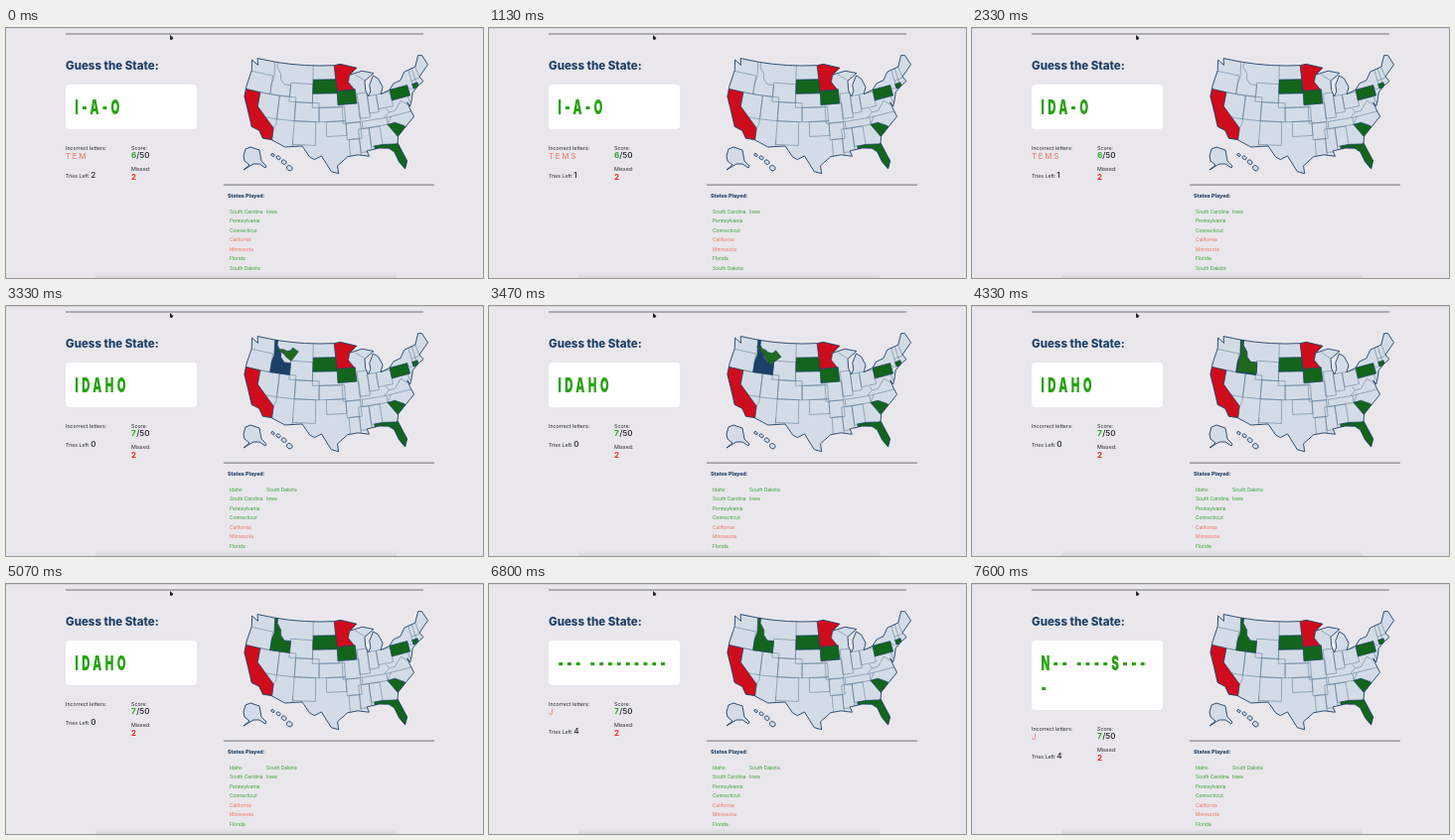
Recreate the animation shown at these times as an HTML page with a canvas. Size 480 px wide and 252 px high, loop 8 s.

```html
<!DOCTYPE html>
<html lang="en">
<head>
<meta charset="utf-8">
<title>Guess the State</title>
<style>
html, body { margin: 0; width: 100%; height: 100%; overflow: hidden; background: #e9e7ec; }
canvas { display: block; width: 480px; height: 252px; }
</style>
</head>
<body>
<canvas id="stage"></canvas>
<script>
const W = 480, H = 252, LOOP = 8000;
const canvas = document.getElementById('stage');
const ctx = canvas.getContext('2d');
const dpr = window.devicePixelRatio || 1;
canvas.width = W * dpr;
canvas.height = H * dpr;

const NAVY = '#1d4068', INK = '#24242c', GREEN = '#2fa32b', CORAL = '#f4705c';
const LAND = '#d3dce6', WON = '#12651b', LOST = '#cf0c1b', LETTER = '#28a212';

// Albers conic projection; longitudes are degrees west
function project(lon, lat) {
  const rad = Math.PI / 180, n = 0.60285;
  const rho = Math.sqrt(1.3512 - 2 * n * Math.sin(lat * rad)) / n;
  const th = n * (101.7 - lon) * rad;
  return [316.3 + 258 * rho * Math.sin(th), 37.7 + 270 * (rho * Math.cos(th) - 1.1007)];
}

// "x y,x y,..." to a path
function trace(text, map = project, close = true) {
  const path = new Path2D();
  text.split(',').forEach((pair, i) => {
    const [x, y] = map(...pair.split(' ').map(Number));
    i ? path.lineTo(x, y) : path.moveTo(x, y);
  });
  if (close) path.closePath();
  return path;
}
const flat = (x, y) => [x, y];
const line = text => trace(text, project, false);
const box = (w, n, e, s) => trace(`${w} ${n},${e} ${n},${e} ${s},${w} ${s}`);

const west = '123 49,122.4 47.6,124.7 48.4,124 46.2,124.5 42.8,124.4 40.4,122.4 37.5,120.6 34.5,118.4 34,117.1 32.5';
const south = '114.8 32.5,111 31.3,106.5 31.8,104.4 29.5,103.2 29,101.4 29.8,99 26.4,97.2 25.9,97.4 27.6,' +
  '94.7 29.4,92 29.6,89.2 29,89.6 30.2,86.3 30.4,83.9 30,82.7 29,82 26.7,80.9 24.9,80 26.5,81.4 30.7';
const east = '80.9 32.1,78 33.9,75.5 35.3,76 37,76.3 38.6,75.8 37.6,75.1 38.5,74 40.3,71.8 41.3,70 41.8,' +
  '70.7 43,67 44.8,67.8 47.1,69 47.4,71 45.3,74.8 45';
const lakes = '76.6 43.5,79 43.2,80.5 42.1,83.4 41.6,82.4 43,83.3 45,84.7 45.8,86.3 44,86.3 42.6,87.2 41.6,' +
  '87.8 43,87.6 45,84.4 46.3,88 47.2,92.1 46.7,89.6 48,95 49.2';
const north = Array.from({ length: 5 }, (_, i) => `${97 + 5 * i} 49`).join();
const country = trace([west, south, east, lakes, north].join());

// Inner states are boxes of latitude and longitude; the coast clips the rest
const borders = [
  box(125, 46, 117, 42), box(120, 42, 114.05, 37), box(114.05, 42, 109.05, 37),
  box(111.05, 45, 104.05, 41), box(109.05, 41, 102.05, 37), box(109.05, 37, 103, 32),
  box(104.05, 49.5, 96.8, 45.95), box(104.05, 43, 96, 40), box(102.05, 40, 94.6, 37),
  box(100, 37, 94.5, 33.9), box(95.3, 40.5, 90.3, 36.5), box(94.5, 36.5, 90.5, 33),
  box(94, 33, 91.2, 29), box(91.2, 35, 88.3, 30), box(88.3, 35, 85.3, 31),
  box(90.5, 42.5, 87.5, 37.2), box(87.5, 41.7, 84.8, 38), box(84.8, 41.7, 80.5, 38.6),
  box(90, 36.5, 83, 35), box(73.4, 46, 72.2, 41),
  line('114.05 37,114.05 36,114.6 35'), line('109.05 33,109.05 31'),
  line('90.4 46.6,87.6 45.1'), line('83 36.5,75 36.5'),
  line('82.6 38.4,82 37.5,80.3 37.5,78 39.3,76.3 38'), line('82 37.5,83.5 36.6'),
  line('83.1 35,81.7 36.5'), line('75.7 39.8,75.6 38.5,75 38.5'), line('75 41.5,74 41'),
  line('73.4 42.7,70.8 42.8'), line('71 45.3,70.8 43')
];
const won = [
  box(104, 45.95, 96.5, 43), box(96.5, 43.5, 90.9, 40.5), box(80.5, 42.1, 75, 39.8), box(73.5, 42, 71.8, 41),
  trace('83.1 35,81 35.1,78.6 33.9,78 32,81 32'),
  trace('87.5 31,85 31,82 30.6,80 30.8,79 24,87.5 24')
];
const lost = [
  trace('126 42,120 42,120 39,114.6 35,114.6 32,126 32'),
  trace('97.2 50,89 50,89 48,92.2 46.7,92.8 45.2,91.2 43.5,96.5 43.5')
];
const idaho = trace('117 49,116 49,116 48,114.5 46.6,114.3 45.5,113 44.5,111 44.5,111 42,117 42,117 44.3,116.5 45.8');
const alaska = trace('239 129,241 122,246 120,255 123,257 134,262 139,261 141,255 137,249 137,239 143,245 138,240 134', flat);
const pointer = trace('165 7,165 11.4,167 12,168.4 10', flat);

const steps = [
  { at: 0, word: ['I-A-O'], wrong: 'TEM', tries: 2 },
  { at: 1130, word: ['I-A-O'], wrong: 'TEMS', tries: 1 },
  { at: 2330, word: ['IDA-O'], wrong: 'TEMS', tries: 1 },
  { at: 3330, word: ['IDAHO'], wrong: '', tries: 0 },
  { at: 5200, word: ['--- ---------'], wrong: '', tries: 5 },
  { at: 5670, word: ['--- ---------'], wrong: 'J', tries: 4 },
  { at: 6870, word: ['--- ----S---', '-'], wrong: 'J', tries: 4 },
  { at: 7530, word: ['N-- ----S---', '-'], wrong: 'J', tries: 4 }
];
const SOLVED = 3330, SPIN = 1540;
const played = ['South Carolina', 'Pennsylvania', 'Connecticut', 'California', 'Minnesota', 'Florida', 'South Dakota', 'Iowa'];
const missed = ['California', 'Minnesota'];

function text(str, x, y, size, color, weight = 400, spacing = 0) {
  ctx.font = `${weight} ${size}px Inter, sans-serif`;
  ctx.letterSpacing = spacing + 'px';
  ctx.fillStyle = color;
  ctx.fillText(str, x, y);
}

function outline(path, width, color = NAVY) {
  ctx.lineWidth = width;
  ctx.strokeStyle = color;
  ctx.stroke(path);
}

function shape(path, fill, width = 0.7) {
  ctx.fillStyle = fill;
  ctx.fill(path);
  outline(path, width);
}

function rule(x1, x2, y) {
  ctx.fillStyle = '#70707b';
  ctx.fillRect(x1, y, x2 - x1, 1);
}

function drawFrame() {
  ctx.fillStyle = '#e9e7ec';
  ctx.fillRect(0, 0, W, H);
  ctx.fillStyle = '#d6d4da';
  ctx.fillRect(0, 0, W, 1);
  rule(60, 420, 5.5);
  rule(219, 431, 157.6);
  const shade = ctx.createLinearGradient(0, 246, 0, H);
  shade.addColorStop(0, 'rgba(150,148,154,0)');
  shade.addColorStop(1, 'rgba(150,148,154,.2)');
  ctx.fillStyle = shade;
  ctx.fillRect(90, 246, 303, 6);
  ctx.fillStyle = '#222';
  ctx.fill(pointer);
}

// The solved state swings out small and settles over its navy base
function drawIdaho(t) {
  const p = Math.min(1, (t - SOLVED) / SPIN);
  if (p < 0) return outline(idaho, 0.55, '#5b7793');
  if (p === 1) return shape(idaho, WON);
  const q = (1 - p) ** 3;
  shape(idaho, NAVY);
  ctx.save();
  ctx.translate(276 + 7 * q, 53 - 7 * q);
  ctx.rotate(-q * Math.PI / 3);
  ctx.scale(1 - 0.4 * q, 1 - 0.4 * q);
  ctx.translate(-276, -53);
  shape(idaho, '#1f6a1d');
  ctx.restore();
}

function drawMap(t) {
  ctx.lineJoin = 'round';
  ctx.save();
  ctx.clip(country);
  ctx.fillStyle = LAND;
  ctx.fill(country);
  borders.forEach(b => outline(b, 0.55, '#5b7793'));
  won.forEach(s => shape(s, WON));
  lost.forEach(s => shape(s, LOST));
  ctx.restore();
  outline(country, 0.9);
  drawIdaho(t);
  shape(alaska, LAND, 0.9);
  for (let i = 0; i < 4; i++) {
    const island = new Path2D();
    island.ellipse(268.5 + 5.6 * i, 128 + 2 * i + 0.8 * i * i, 1.8 + 0.4 * i, 1.3 + 0.4 * i, 0.6, 0, 2 * Math.PI);
    shape(island, LAND, 0.9);
  }
}

function drawGame({ word, wrong, tries }, score) {
  const drop = (word.length - 1) * 25;
  text('Guess the State:', 60, 42, 11.5, NAVY, 800);

  ctx.fillStyle = '#fff';
  ctx.beginPath();
  ctx.roundRect(60, 57, 132, 45 + drop, 4);
  ctx.fill();

  // condensed display face
  ctx.save();
  ctx.translate(69.4, 87);
  ctx.scale(0.55, 1);
  word.forEach((row, i) => text(row, 0, i * 25, 20.8, LETTER, 900, 6.2));
  ctx.restore();

  ctx.save();
  ctx.translate(0, drop);
  text('Incorrect letters:', 60, 122.8, 5.3, INK);
  text(wrong, 60, 131.6, 8, CORAL, 400, 1.7);
  const y = wrong ? 151.4 : 141.8;
  text('Tries Left:', 60, y, 5.2, INK);
  text(tries, 85.3, y, 8.2, INK, 500);
  text('Score:', 126, 122.8, 5.3, INK);
  text(score, 126, 131.4, 8.2, GREEN, 700);
  text('/50', 131.2, 131.4, 8.2, INK, 500);
  text('Missed:', 126, 144, 5.3, INK);
  text('2', 126, 153.2, 8, '#ee2a24', 700);
  ctx.restore();
}

// Seven names per column
function drawList(names) {
  text('States Played:', 223, 171, 5.3, NAVY, 800);
  names.forEach((name, i) => {
    const color = missed.includes(name) ? CORAL : GREEN;
    text(name, i < 7 ? 225 : 262, 186.7 + (i % 7) * 9.55, 4.85, color);
  });
}

function render(t) {
  const step = steps.filter(s => s.at <= t).pop();
  const solved = t >= SOLVED;
  ctx.setTransform(dpr, 0, 0, dpr, 0, 0);
  drawFrame();
  drawMap(t);
  drawGame(step, solved ? 7 : 6);
  drawList(solved ? ['Idaho', ...played] : played);
}

const start = performance.now();
function tick() {
  render((performance.now() - start) % LOOP);
  requestAnimationFrame(tick);
}
tick();
</script>
</body>
</html>
```
